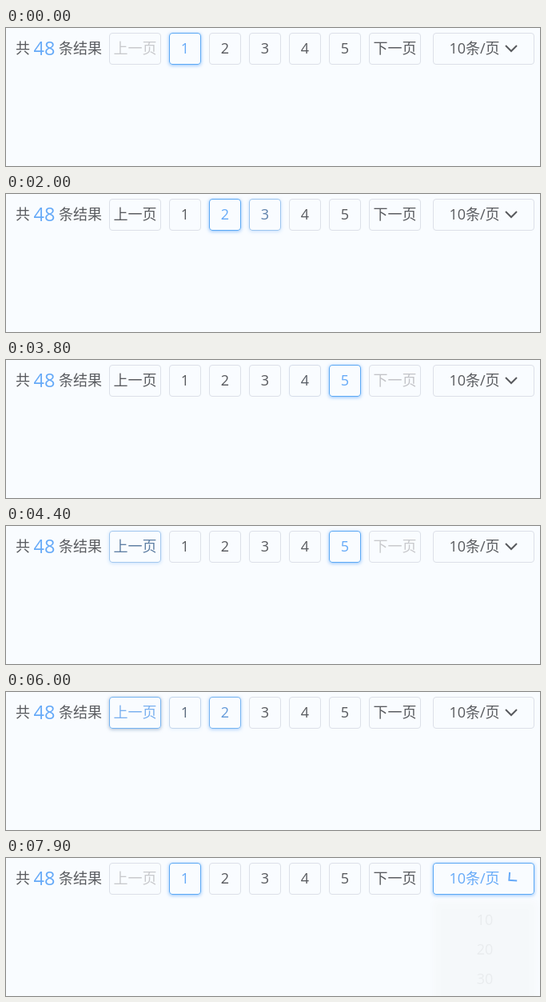
Animation, 668 px wide and 173 px high, one loop 8 s. Source, as an HTML page with a canvas:

```html
<!DOCTYPE html>
<html lang="zh-CN">
<head>
<meta charset="utf-8">
<title>分页</title>
<style>
  html, body { margin: 0; width: 100%; height: 100%; overflow: hidden; background: #f9fcff; }
  canvas { display: block; }
</style>
</head>
<body>
<canvas id="stage" width="668" height="173"></canvas>
<script>
const ctx = document.getElementById('stage').getContext('2d');
const LOOP = 8000, STEP = 100, FADE = 200;
const START = -1000, END = 9000;
const FAMILY = '"Open Sans", "Noto Sans CJK SC", "Noto Sans CJK", sans-serif';

const BACK = '#f9fcff';
const DARK = [88, 90, 94], BLUE = [102, 170, 248], EDGE = [220, 224, 232];
const EDGE_ON = [90, 168, 245], MUTED = [200, 201, 204], GREY = [120, 125, 135];

// Spans of time, in ms, during which a control is hovered or current, or disabled.
const buttons = [
  { text: '上一页', x: 129, w: 65, lit: [[4310, 7200]], off: [[START, 1550], [5960, END]] },
  { text: '1', x: 204, w: 40, lit: [[START, 1550], [4150, 4190], [5960, END]] },
  { text: '2', x: 254, w: 40, lit: [[1150, 2250], [4080, 4130], [5510, 5960]] },
  { text: '3', x: 304, w: 40, lit: [[540, 660], [1900, 2770], [4020, 4060], [5010, 5510]] },
  { text: '4', x: 354, w: 40, lit: [[515, 540], [2500, 3610], [3950, 4000], [4520, 5010]] },
  { text: '5', x: 404, w: 40, lit: [[490, 515], [3050, 4520]] },
  { text: '下一页', x: 454, w: 65, lit: [[450, 490]], off: [[3610, 4520]] },
  { text: '10条/页', x: 534, w: 127, lit: [[360, 450], [7560, END]], textX: 586, arrow: true }
];
const OPEN_AT = 7845;

const clamp = v => Math.max(0, Math.min(1, v));
const mix = (a, b, k) => a.map((v, i) => v + (b[i] - v) * k);
const rgb = (c, alpha = 1) => `rgba(${c.map(Math.round).join()},${alpha})`;

// Fades in from the start of each span and back out from its end.
function level(spans = [], t) {
  return Math.max(0, ...spans.map(([from, to]) =>
    clamp((Math.min(t, to) - from) / FADE) - clamp((t - to) / FADE)));
}

function label(text, x, baseline, color, size = 18, align = 'center') {
  ctx.font = `${size}px ${FAMILY}`;
  ctx.textAlign = align;
  ctx.fillStyle = color;
  ctx.fillText(text, x, baseline);
}

function box(x, y, w, h, fill, shadow, blur) {
  ctx.save();
  ctx.beginPath();
  ctx.roundRect(x, y, w, h, 4);
  ctx.shadowColor = shadow;
  ctx.shadowBlur = blur;
  ctx.shadowOffsetY = 1;
  ctx.fillStyle = fill;
  ctx.fill();
  ctx.restore();
}

function chevron(x, y, angle, color) {
  ctx.save();
  ctx.translate(x, y);
  ctx.rotate(angle);
  ctx.beginPath();
  ctx.moveTo(-7, -3.5);
  ctx.lineTo(0, 3.5);
  ctx.lineTo(7, -3.5);
  ctx.lineWidth = 2;
  ctx.strokeStyle = color;
  ctx.stroke();
  ctx.restore();
}

function drawButton({ text, x, w, lit, off, textX = x + w / 2, arrow }, t) {
  const on = level(lit, t), disabled = level(off, t);
  const color = rgb(mix(mix(DARK, BLUE, on), MUTED, disabled));
  const edge = mix(EDGE, EDGE_ON, on * (1 - disabled));
  const shade = mix(BLUE, GREY, Math.min(1, disabled * 3));

  box(x, 6, w, 40, BACK, rgb(shade, on * (0.7 - 0.45 * disabled)), 4);
  ctx.beginPath();
  ctx.roundRect(x + 0.5, 6.5, w - 1, 39, 3.5);
  ctx.lineWidth = 1;
  ctx.strokeStyle = rgb(edge);
  ctx.stroke();
  label(text, textX, 32, color);
  if (arrow) chevron(632, 25.5, Math.PI * clamp((t - OPEN_AT) / FADE), color);
}

function drawMenu(t) {
  const open = clamp((t - OPEN_AT) / FADE);
  if (!open) return;
  ctx.globalAlpha = open * open;
  box(534, 53, 130, 140, '#fff', 'rgba(0,0,0,.25)', 8);
  ['10', '20', '30'].forEach((text, i) => label(text, 599, 84 + 37 * i, rgb(DARK)));
  ctx.globalAlpha = 1;
}

function draw(now) {
  const t = Math.floor(now % LOOP / STEP) * STEP;
  ctx.fillStyle = BACK;
  ctx.fillRect(0, 0, 668, 173);
  label('共', 12, 32, rgb(DARK), 18, 'left');
  label('48', 48, 34, rgb(BLUE), 23.5);
  label('条结果', 66, 32, rgb(DARK), 18, 'left');
  buttons.forEach(button => drawButton(button, t));
  drawMenu(t);
}

const begin = performance.now();
function tick() {
  draw(performance.now() - begin);
  requestAnimationFrame(tick);
}
tick();
</script>
</body>
</html>
```
